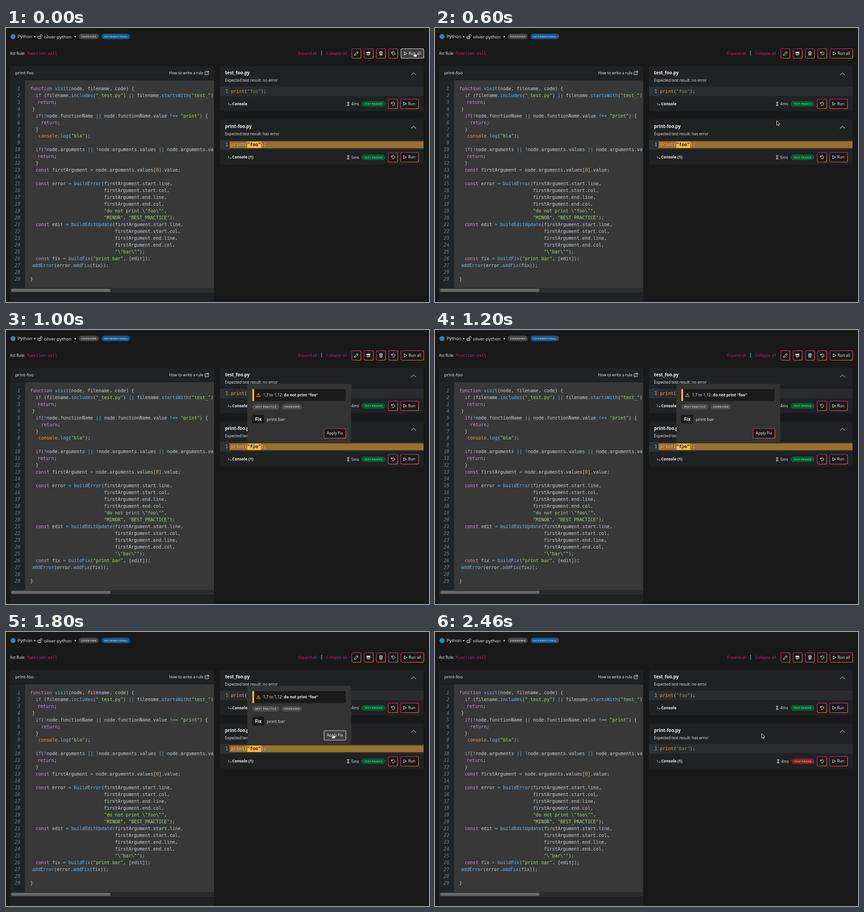
Recreate the animation shown at these times as an HTML page. Size 929 by 603 pixels, loop 2720 ms.

```html
<!DOCTYPE html>
<html lang="en">
<head>
<meta charset="utf-8">
<title>Rule editor</title>
<style>
html, body { margin: 0; width: 100%; height: 100%; overflow: hidden; background: #191919; }
svg { display: block; width: 929px; height: 603px; }
text { font: 8.55px "Open Sans", sans-serif; fill: #f2f2f2; white-space: pre; }
.title { font-size: 9.95px; font-weight: 700; }
.big { font-size: 9.85px; }
.bold { font-weight: 700; }
.link { fill: #d3207f; }
.code { font: 9.97px "DejaVu Sans Mono", monospace; fill: #ccd0d6; }
.num { font-style: italic; fill: #7d8185; text-anchor: end; }
.tag { font-size: 5.4px; font-weight: 700; letter-spacing: .55px; text-anchor: middle; }
.key { fill: #ca93e0; }
.fn { fill: #6cb9f3; }
.str { fill: #a3dc86; }
.op { fill: #6fb9ea; }
.lit { fill: #eea04f; }
.icon { fill: none; stroke: #e8e8e8; stroke-width: 1; stroke-linecap: round; stroke-linejoin: round; }
</style>
</head>
<body>
<svg id="stage" viewBox="0 0 929 603" xmlns="http://www.w3.org/2000/svg">
  <defs>
    <linearGradient id="edge" x1="0" y1="0" x2="1" y2="1">
      <stop offset="0" stop-color="#e0187f"/>
      <stop offset=".45" stop-color="#ee3f66"/>
      <stop offset="1" stop-color="#ff8a35"/>
    </linearGradient>
    <clipPath id="codeClip"><rect x="42" y="115" width="414" height="457"/></clipPath>
  </defs>
</svg>
<script>
const stage = document.getElementById("stage");
const LOOP = 2720;

const source = String.raw`function visit(node, filename, code) {
  if (filename.includes("_test.py") || filename.startsWith("test_")) {
return;
}
  if(!node.functionName || node.functionName.value !== "print") {
    return;
  }
   console.log("bla");

  if(!node.arguments || !node.arguments.values || node.arguments.values.length
return;
  }
  const firstArgument = node.arguments.values[0].value;

  const error = buildError(firstArgument.start.line,
                           firstArgument.start.col,
                           firstArgument.end.line,
                           firstArgument.end.col,
                           "do not print \"foo\"",
                           "MINOR", "BEST_PRACTICE");
  const edit = buildEditUpdate(firstArgument.start.line,
                               firstArgument.start.col,
                               firstArgument.end.line,
                               firstArgument.end.col,
                               "\"bar\"");
  const fix = buildFix("print bar", [edit]);
addError(error.addFix(fix));

}`.split("\n");

// Lines whose indent is not a whole number of columns
const oddIndent = { 2: 2.7, 3: .7, 10: 2.7, 26: .7 };

const escape = s => s.replace(/&/g, "&amp;").replace(/</g, "&lt;").replace(/>/g, "&gt;");
const span = (s, cls) => `<tspan class="${cls}">${escape(s)}</tspan>`;
const text = (x, y, s, cls = "", attrs = "") => `<text x="${x}" y="${y}" class="${cls}" ${attrs}>${s}</text>`;
const rect = (x, y, w, h, fill, attrs = "") =>
  `<rect x="${x}" y="${y}" width="${w}" height="${h}" fill="${fill}" ${attrs}/>`;
const icon = (x, y, d, attrs = "") => `<path class="icon" transform="translate(${x} ${y})" d="${d}" ${attrs}/>`;
const group = (id, body) => `<g id="${id}">${body}</g>`;

function highlight(line) {
  const token = /("(?:\\.|[^"\\])*"?)|\b(function|if|return|const)\b|(\w+)(?=\()|(\|\||[!=]=*)|(console|\b\d+\b)/g;
  const kinds = ["str", "key", "fn", "op", "lit"];
  let out = "", last = 0;
  for (const m of line.matchAll(token)) {
    out += escape(line.slice(last, m.index));
    out += span(m[0], kinds[m.slice(1).findIndex(Boolean)]);
    last = m.index + m[0].length;
  }
  return out + escape(line.slice(last));
}

function tag(x, y, w, label, fill, color) {
  return rect(x, y, w, 12, fill, 'rx="6"') + text(x + w / 2 + .2, y + 8, label, "tag", `style="fill:${color}"`);
}

function button(x, y, w, h = 21, id = "") {
  return rect(x + .5, y + .5, w - 1, h - 1, "#191919", `rx="2.5" stroke="url(#edge)" stroke-width="1.1" ${id && `id="${id}"`}`);
}

const shapes = {
  play: "M-2.8 -3.2L3 0L-2.8 3.2Z",
  undo: "M-3.6 -3.4V-.9H-1.1M-3.4 -1A3.6 3.6 0 1 1 -2.5 2.5",
  pencil: "M-4.2 4.2L-3.4 1.2L2 -4.1L4.2 -2L-1.2 3.4ZM.7 -2.8L2.9 -.7",
  trash: "M-3.5 -3H3.5M-1.2 -3V-4.2H1.2V-3M-2.8 -2.8L-2.4 4H2.4L2.8 -2.8M-1 -1V2.5M1 -1V2.5",
  chevron: "M-5.3 2.7L0 -2.7L5.3 2.7",
  hourglass: "M-2.3 -3.6H2.3M-2.3 3.6H2.3M-1.7 -3.5C-1.7 -1 1.7 1 1.7 3.5M1.7 -3.5C1.7 -1 -1.7 1 -1.7 3.5",
  prompt: "M-3.5 -2L-1.4 0L-3.5 2M0 2H3.5",
  open: "M1 -3H-3.8V3.8H3.4V1M.6 -3.8H4.2V-.6M4 -3.6L-.6 .9",
  lock: "M-4.5 -.8H1.6V4.4H-4.5ZM.2 -.8V-2.6A2 2 0 0 1 4.2 -2.6V-1.4"
};

function header() {
  const store = icon(796, 56, "M-3.6 -3.2H3.6V-.8H-3.6Z", 'style="fill:#e8e8e8"') +
    icon(796, 56, "M-3 0V3.2H3V0M-1.2 1.3H1.2");
  return `<circle cx="15.5" cy="18.8" r="5.5" fill="#3f7fb5"/>` +
    text(25.5, 22.4, "Python", "big") + text(83.3, 22.6, "oliver-python", "big") +
    [63, 152].map(x => `<circle cx="${x}" cy="19" r="1.5" fill="#eee"/>`).join("") +
    icon(75, 19, shapes.lock) +
    tag(160, 12.5, 43.5, "UNKNOWN", "#464646", "#bdbdbd") +
    tag(210, 12.5, 62.5, "INFORMATIONAL", "#17568c", "#8bc8f5") +
    text(8.7, 58.6, "Ast Rule:", "", 'style="font-size:8.3px"') +
    text(46, 58.7, "function call", "", 'style="font:8.47px \'Liberation Mono\',monospace;fill:#d3207f"') +
    text(641.7, 58.5, "Expand all", "link") + text(703.4, 58.5, "Collapse all", "link") +
    rect(692.5, 50, 1, 11, "#b9b9b9") +
    [759, 786, 813, 840].map(x => button(x, 45, 21, 22)).join("") +
    icon(769.5, 56, shapes.pencil) + store + icon(823.5, 56, shapes.trash, 'stroke-width=".8"') +
    icon(850.5, 56, shapes.undo) +
    button(867, 45, 51, 22, "runAll") + icon(877.8, 56, shapes.play) + text(884.3, 58.8, "Run all");
}

function editor() {
  const rows = source.map((line, i) => {
    const y = (136.7 + i * 14.97).toFixed(2);
    const indent = oddIndent[i] ?? line.search(/\S|$/);
    return text(31.3, y, i + 1, "code num") +
      `<g clip-path="url(#codeClip)">${text(53.3 + indent * 6, y, highlight(line.trim()), "code")}</g>`;
  }).join("");
  return rect(9, 84, 448, 518, "#1f2123") + rect(9, 115, 33, 457, "#212426") +
    rect(42, 115, 415, 457, "#383838") + rect(9, 114, 448, 1, "#181a1b") +
    text(20.5, 102.3, "print-foo", "big") + text(358, 102, "How to write a rule") +
    icon(441, 99, shapes.open) + rows +
    rect(9, 572, 448, 11, "#292b2c") + rect(11.5, 574, 218, 6.5, "#6a6a6a", 'rx="3.2"') +
    rect(9, 583, 448, 1, "#151617");
}

function codeRow(y, word) {
  return rect(470, y, 447, 21, "#2a2b2c") + rect(470, y, 21, 21, "#2f3235") +
    text(482, y + 13.6, "1", "code", 'style="fill:#a9adb0"') +
    text(493.7, y + 13.6, span("print", "lit") + "(" +
      `<tspan fill="#7f9a6b">"${word}"</tspan>);`, "code");
}

function status(y, dx, ms, label, fill, color) {
  return icon(751.5 + dx, y, shapes.hourglass, 'stroke-width=".9"') + text(758.3 + dx, y + 3.2, ms) +
    tag(781 + dx, y - 6, 52 - dx, label, fill, color);
}
const passed = (y, ms) => status(y, 0, ms, "TEST PASSED", "#0b5b34", "#35dd78");

function testCard(y, name, expected, log) {
  const mid = y + 82.5;
  return rect(470, y, 447, 99, "#1f2123") +
    text(481, y + 18.4, name, "title") + text(481, y + 34, `Expected test result: ${expected}`) +
    icon(895, y + 17, shapes.chevron) +
    icon(491.5, mid + .3, shapes.prompt, 'stroke-width=".9"') + text(496.7, mid + 3.1, log, "bold") +
    button(839, y + 72, 21.5, 22) + icon(850, mid + .5, shapes.undo) +
    button(866, y + 72, 40.5, 22) + icon(876.5, mid + .3, shapes.play) + text(883.3, mid + 3.2, "Run");
}

function flaggedRow() {
  return codeRow(246.5, "foo") + rect(491, 249.3, 426, 15.2, "#9a702f") +
    rect(530, 250, 30.3, 14, "#ffb83d") +
    text(493.7, 260.1, `<tspan fill="#f0ad5c">print</tspan><tspan fill="#e6d3b0">(</tspan>` +
      `<tspan fill="#1c1710" font-weight="700">"foo"</tspan><tspan fill="#dcc493">);</tspan>`, "code");
}

function popup() {
  return rect(530, 118.5, 228, 128.5, "#333334", 'rx="1.5"') +
    rect(541, 130, 205, 26.5, "#1a1a1a", 'rx="2"') + rect(541, 130, 4, 26.5, "#f5b13f", 'rx="1"') +
    icon(554.5, 143.5, "M0 -3.8L4 3.4H-4ZM0 -1.2V.8M0 2.1V2.2", 'style="stroke:#f0a63a"') +
    text(564.5, 146.2, '1,7 to 1,12: <tspan class="bold">do not print "foo"</tspan>') +
    tag(541, 163, 59, "BEST PRACTICE", "#4d4d4e", "#bdbdbd") +
    tag(605.5, 163, 44.5, "UNKNOWN", "#4d4d4e", "#bdbdbd") +
    rect(541, 186.5, 26, 19, "#1a1a1a", 'rx="2"') +
    text(546.9, 199.7, "Fix", "title") + text(572.7, 199.5, "print bar", "big") +
    button(698, 216.5, 49, 22, "apply") + text(704.5, 230.2, "Apply Fix");
}

const outline = 'stroke-linejoin="round" stroke-linecap="round"';
const cursors = {
  arrow: `<path d="M0 0V9.6L2.3 7.5L3.8 11L5.5 10.2L4 6.9H7Z" fill="#0a0a0a" stroke="#fff" stroke-width=".9" ${outline}/>`,
  hand: `<path d="M-1 .8C-1 -.5 .9 -.5 .9 .8V4L4.6 4.7C5.6 5 5.8 5.6 5.6 6.6L4.8 10.6H-.6C-1.4 9 -3 7.6 -3.4 6.2C-3.3 5.1 -2 5.2 -1 6.4Z" fill="#fff" stroke="#111" stroke-width=".8" ${outline}/>
    <path d="M1.2 7V9M3 7V9" stroke="#333" stroke-width=".6"/>`,
  beam: ["#fff", "#151515"].map((c, i) =>
    `<path d="M-2 -5.3Q0 -5.3 0 -4.2Q0 -5.3 2 -5.3M0 -4.2V4.2M-2 5.3Q0 5.3 0 4.2Q0 5.3 2 5.3M-1.2 1.6H1.2" fill="none" stroke="${c}" stroke-width="${i ? .9 : 2}" ${outline}/>`).join("")
};

stage.insertAdjacentHTML("beforeend",
  header() + editor() +
  testCard(84, "test_foo.py", "no error", "Console") + codeRow(129, "foo") + passed(167, "4ms") +
  testCard(201.5, "print-foo.py", "has error", "Console (1)") +
  group("before", flaggedRow() + passed(284.5, "5ms")) +
  group("after", codeRow(246.5, "bar") + status(284.5, 2, "4ms", "TEST FAILED", "#8d2026", "#ff8a8a")) +
  group("popup", popup()) +
  Object.keys(cursors).map(k => group(k, cursors[k])).join(""));

// The pointer holds each pose until the next start time
const poses = [
  [0, "hand", 897, 53.5],
  [600, "arrow", 750.5, 204.5],
  [800, "beam", 545.5, 255],
  [1000, "beam", 544.5, 256],
  [1200, "beam", 542.8, 257],
  [1400, "arrow", 640, 236],
  [1600, "arrow", 712.5, 213],
  [1800, "hand", 718, 224],
  [2200, "hand", 718, 225],
  [2460, "arrow", 717.5, 224]
];

const part = Object.fromEntries([...stage.querySelectorAll("[id]")].map(el => [el.id, el]));
const show = (el, on) => el.setAttribute("visibility", on ? "visible" : "hidden");

function hover(el, on) {
  el.setAttribute("fill", on ? "#414141" : "#191919");
  el.setAttribute("stroke", on ? "#d8d8d8" : "url(#edge)");
}

function render(t) {
  const [, kind, x, y] = poses.findLast(p => p[0] <= t);
  for (const name in cursors) show(part[name], name === kind);
  part[kind].setAttribute("transform", `translate(${x} ${y})`);
  const fixed = t >= 2460;
  show(part.before, !fixed);
  show(part.after, fixed);
  show(part.popup, t >= 800 && !fixed);
  hover(part.runAll, t < 600);
  hover(part.apply, t >= 1800 && !fixed);
}

const start = performance.now();
function tick() {
  render((performance.now() - start) % LOOP);
  requestAnimationFrame(tick);
}
tick();
</script>
</body>
</html>
```
